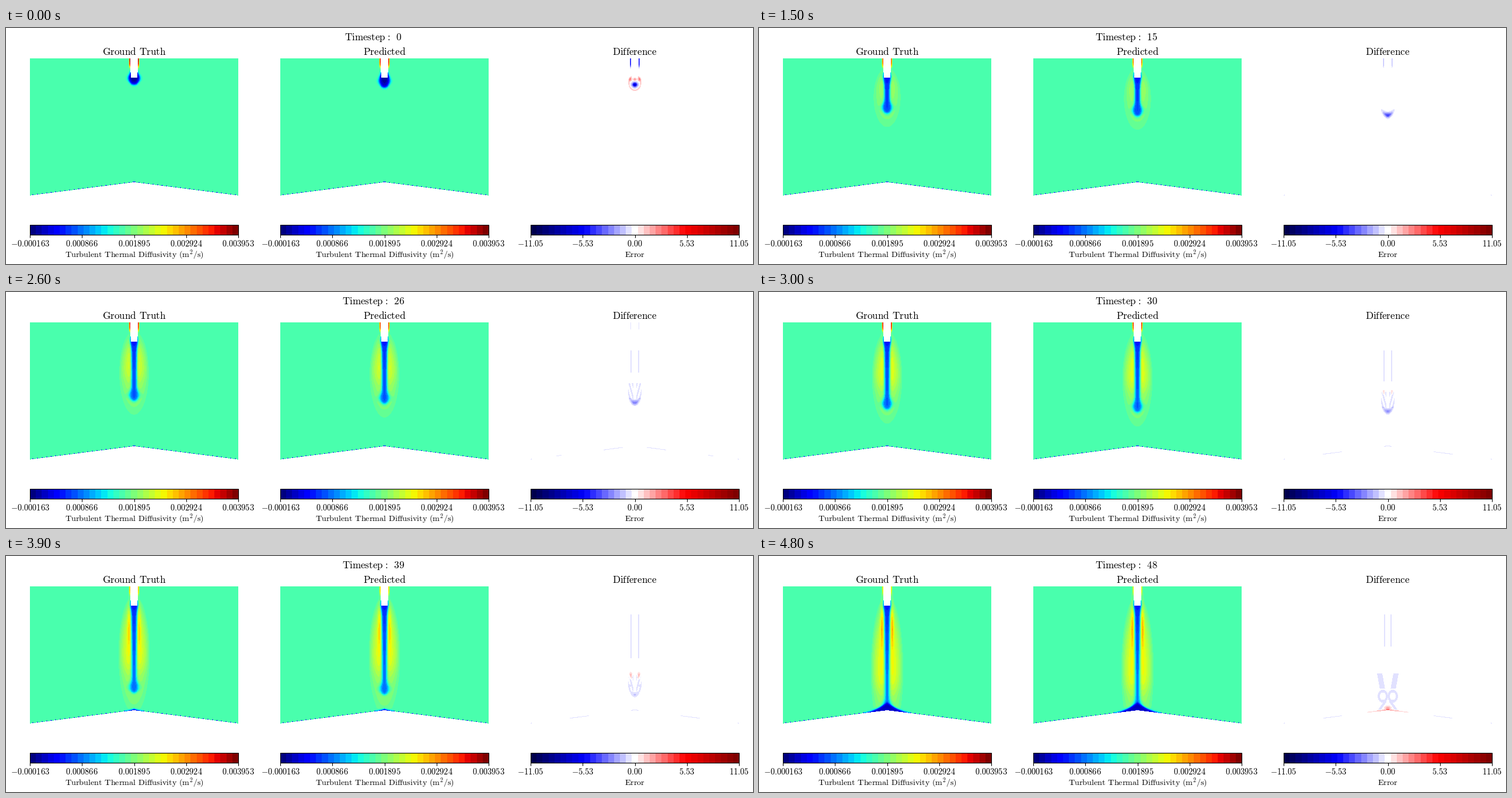
A matplotlib script that plays this animation: 1280x404 px, repeating every 4.9 s.

```python
import numpy as np
import matplotlib as mpl
import matplotlib.pyplot as plt
from matplotlib.animation import FuncAnimation
from matplotlib.patches import Rectangle

mpl.rcParams["mathtext.fontset"] = "cm"

WIDTH, HEIGHT, DPI = 1280, 404, 100
STEPS, BANDS = 49, 35
LEFTS = (41, 470, 899)
TOP, BOTTOM, SPAN = 52, 287, 357
BAR_TOP, BAR_BOTTOM = 337, 354
BASE = 0.4412

JET = mpl.colormaps["jet"](np.linspace(0, 1, BANDS))[:, :3]
SEISMIC = mpl.colormaps["seismic"](np.linspace(0, 1, BANDS))[:, :3]
SEISMIC[BANDS // 2] = 1

# Pixel grid of one panel; everything is mirrored about its centre line.
DX, Y = np.meshgrid(np.abs(np.arange(SPAN) + 0.5 - SPAN / 2),
                    np.arange(TOP, BOTTOM) + 0.5)
GROUND = 264 + 22.8 * DX / (SPAN / 2)
GAP = GROUND - Y
DEPTH = np.clip((Y - 84) / 180, 0, 1)
NOZZLE = (DX < 6.6 - 0.025 * (Y - TOP)) & (Y < 85)
OUTSIDE = (GAP < 0) | NOZZLE
DOTS = (GAP >= 0) & (GAP < 1) & (GROUND % 1 < 0.27)


def soft(v, width=1.0):
    return 1 / (1 + np.exp(-np.clip(v / width, -40, 40)))


def bell(v, width):
    return np.exp(-(v / width) ** 2)


def settle(t, tau):
    return 1 - np.exp(-t / tau)


def blend(u, value, weight):
    return u + (value - u) * weight


def tip_at(t):
    return 97 + 3.7 * t - 7 * settle(t, 6)


def impact(t):
    return soft(t - 40, 2.5)


def field(t, predicted):
    spread = impact(t)
    tip = tip_at(t)
    if predicted:
        tip += 5 * (1 - spread)

    # halo of raised diffusivity, weaker around the head
    top = 84 - 17 * settle(t, 5)
    low = tip + 5 + 19 * settle(t, 4) + 30 * spread
    wide = 8 + 15 * settle(t, 6) + 0.1 * t
    q = (DX / wide) ** 2 + ((Y - (top + low) / 2) / ((low - top) / 2)) ** 2
    rise = 0.02 + 0.21 * settle(t, 20)
    rise = rise * (1 - 0.5 * soft(Y - tip + 40, 8))
    u = BASE + np.where(q < 1, 0.015 + rise * np.clip(1 - q, 0, 1), 0)
    u += 0.17 * soft(t - 38, 5) * bell(DX - 8.5, 3.2) * bell(Y - 118, 36)

    # hot strips beside the nozzle
    hot = np.interp(t, [0, 7, 15, 34, 43, 48], [1, 0.68, 0.86, 0.98, 0.52, 0.66])
    if predicted:
        hot = blend(hot, BASE, 0.1)
    u = blend(u, hot, soft(8.2 - DX, 0.5) * soft(66 - Y, 2))

    # cold core: crisp below the nozzle, softer towards a wider head
    head = bell(Y - tip + 10, 9)
    w = 5 - 1.2 * DEPTH + 2.6 * head + 1.6 * bell(Y - 84, 10)
    blur = 0.9 + 0.7 * DEPTH + 0.6 * head
    nose = tip - 0.035 * DX ** 2
    start = soft(Y - 72, 3)
    rim = soft(w + 2 - DX, blur) * soft(nose + 1 - Y, 1.5) * start
    u = blend(u, 0.34, 0.6 * head * rim)
    cold = 0.18 - 0.12 * np.exp(-t / 4) + 0.06 * DEPTH
    cold -= 0.04 * np.exp(-np.clip(Y - 84, 0, 200) / 8)
    u = blend(u, cold, soft(w - DX, blur) * soft(nose - Y, 1.5) * start)

    # cold layer spreading over the ground
    reach = 42 * spread
    layer = 14 * spread ** 2 * np.clip(1 - DX / reach, 0, 1) ** 1.7
    u = blend(u, 0.08, soft(layer - GAP, 0.9) * (DX < reach))
    return np.where(DOTS, 0.14, u)


def error(t):
    tip, spread = tip_at(t), impact(t)
    early, late = np.exp(-t / 2), soft(t - 46, 0.7)

    # crescent where the predicted tip runs ahead
    size = 7 * np.exp(-t / 28) * (1 - spread)
    arc = Y - tip - 3.2 * settle(t, 3) + 0.08 * settle(t, 8) * DX ** 2
    d = -size * bell(arc, 4) * bell(DX, 4.5 + 3 * settle(t, 5))

    # strips beside the nozzle
    strip = -6 * np.cos(np.pi * t / 7) * np.exp(-t / 12)
    d += strip * bell(DX - 7.3, 0.9) * soft(66 - Y, 1.5)

    # outline and blotches of the first steps
    d += 1.1 * early * bell(np.hypot(DX, 0.8 * (Y - 94)) - 10, 1.2) * (Y > 74)
    d += 2.2 * early * (bell(DX - 7.5, 2.5) + bell(DX, 2.5)) * bell(Y - 88, 3)

    # core edges, mottled head, traces along the ground
    shown = soft(t - 20, 1)
    edge = np.abs(DX - 6.8 + 1.5 * spread) < 1
    edge &= (Y > 100) & (Y < tip - 48 - 70 * spread ** 2)
    d -= 0.55 * shown * edge
    patch = (np.abs(DX - 7) < 4.5) & (np.abs(Y - tip + 16) < 14)
    patch &= np.sin(DX * 1.1 + (Y - tip) * 0.3) > 0.1
    d -= 0.5 * shown * (1 - late) * patch
    trace = (GAP >= 0) & (GAP < 1.1) & (DX < 135)
    trace &= np.sin(DX * 0.06 + t * 0.7) > 0.55
    d -= 0.45 * shown * trace

    # warm spots over the head, cool ones inside it at impact
    d += 1.4 * bell(t - 38, 8) * bell(DX - 7, 2.3) * bell(Y - tip + 30, 5)
    d -= 1.3 * spread * (1 - late) * bell(DX - 8, 3) * bell(Y - tip + 12, 3)

    # rebound: two arms, two rings, two legs and a warm base
    arm = (np.abs(DX - 14 + (Y - 201) * 0.18) < 4.5) & (np.abs(Y - 214) < 13)
    ring = np.abs(np.hypot(DX - 8.5, (Y - 240) * 0.8) - 7) < 1.8
    leg = (np.abs(DX - 5 - (Y - 250) * 0.7) < 2.5) & (np.abs(Y - 256) < 7)
    d -= 0.6 * late * (arm | ring | leg)
    d += late * (2.2 * bell(DX, 5) * bell(Y - 261, 4) + 1.6 * bell(DX, 28) * (GAP < 1.8))

    corner = (DX > 176.5) & (GAP >= 0) & (GAP < 1.2)
    return d - 0.5 * settle(t, 0.3) * corner


def paint(u, colors):
    rgb = colors[np.clip((u * BANDS).astype(int), 0, BANDS - 1)]
    rgb[OUTSIDE] = 1
    return rgb


def panels(t):
    return (paint(field(t, False), JET),
            paint(field(t, True), JET),
            paint(error(t) / 22.1 + 0.5, SEISMIC))


def roman(s):
    return r"$\mathrm{" + s.replace(" ", r"\hspace{0.38}") + "}$"


def heading(t):
    return r"$\mathrm{Timestep\hspace{0.1}:\hspace{0.47}%d}$" % t


fig = plt.figure(figsize=(WIDTH / DPI, HEIGHT / DPI), dpi=DPI, facecolor="white")
ax = fig.add_axes([0, 0, 1, 1])
ax.axis("off")


def write(x, y, s, px):
    return ax.text(x, y, s, fontsize=px * 72 / DPI, ha="center", va="baseline")


def picture(left, top, bottom, data):
    return ax.imshow(data, extent=(left, left + SPAN, bottom, top),
                     interpolation="nearest", aspect="auto")


def colorbar(left, colors, low, high, form, caption):
    picture(left, BAR_TOP, BAR_BOTTOM, colors[None])
    ax.add_patch(Rectangle((left, BAR_TOP), SPAN, BAR_BOTTOM - BAR_TOP,
                           fill=False, ec="black", lw=0.8))
    for part in np.linspace(0, 1, 5):
        x = left + SPAN * part
        ax.plot([x, x], [BAR_BOTTOM, BAR_BOTTOM + 5], color="black", lw=0.8,
                solid_capstyle="butt")
        write(x, 374, roman(form % (low + (high - low) * part)), 14.4)
    write(left + SPAN / 2, 391.5, caption, 14.2)


UNITS = (roman("Turbulent Thermal Diffusivity (m")[:-1]
         + r"^{\mathbf{2}}\mathrm{/s)}$")

images = [picture(x, TOP, BOTTOM, p) for x, p in zip(LEFTS, panels(0))]
for x, name in zip(LEFTS, ["Ground Truth", "Predicted", "Difference"]):
    write(x + SPAN / 2, 45.5, roman(name), 17.2)
for x in LEFTS[:2]:
    colorbar(x, JET, -0.000163, 0.003953, "%.6f", UNITS)
colorbar(LEFTS[2], SEISMIC, -11.051, 11.051, "%.2f", roman("Error"))
title = write(629, 21, heading(0), 17.1)
ax.set_xlim(0, WIDTH)
ax.set_ylim(HEIGHT, 0)


def update(t):
    for image, data in zip(images, panels(t)):
        image.set_data(data)
    title.set_text(heading(t))
    return [*images, title]


anim = FuncAnimation(fig, update, frames=STEPS, interval=100, repeat=True)
plt.show()
```
